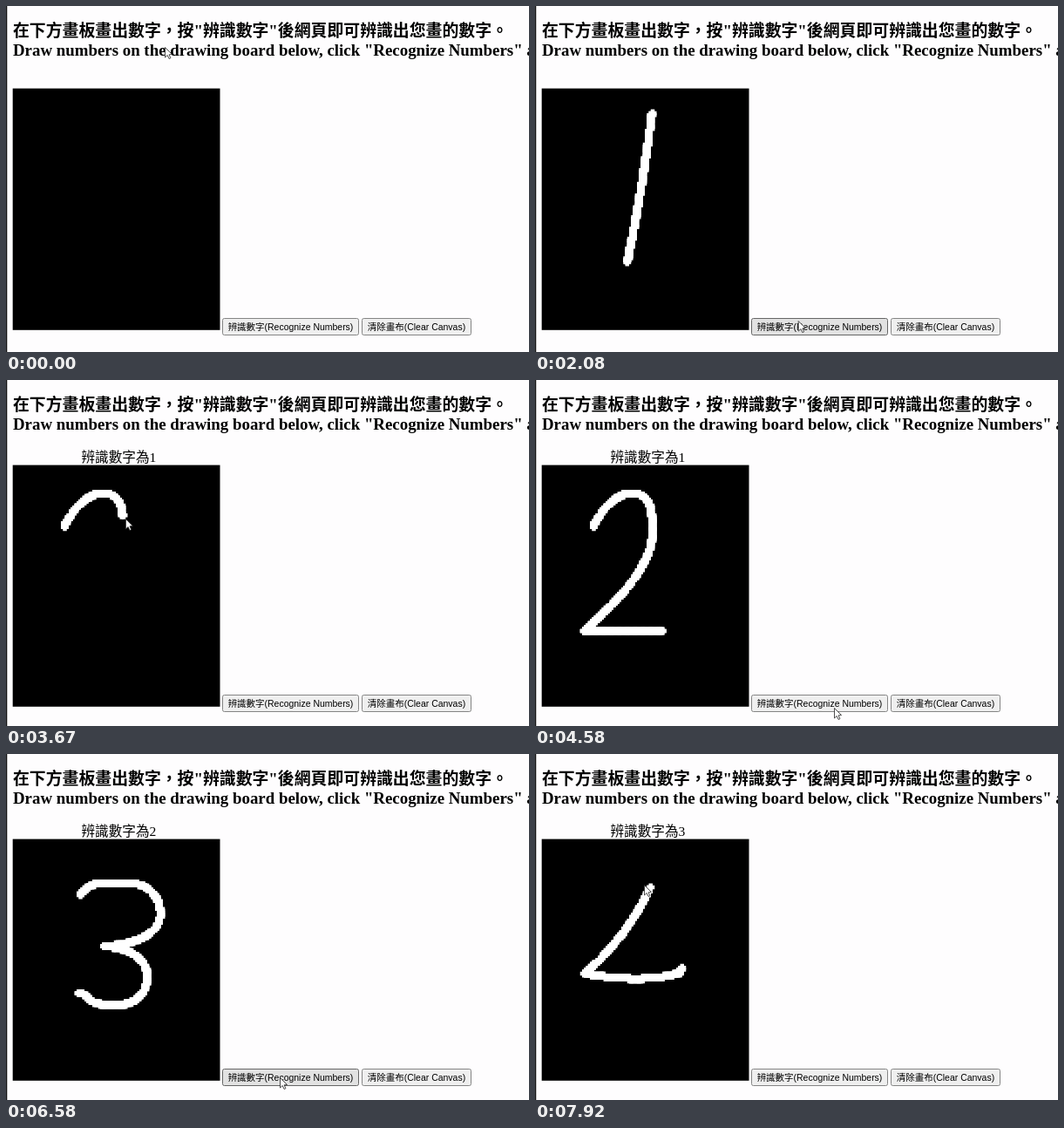
Write an HTML page with a canvas that moves like this. It is 600 px wide and 397 px high and loops after 8 s.

```html
<!DOCTYPE html>
<html lang="zh-TW">
<head>
<meta charset="utf-8">
<title>Digit recognition</title>
<style>
  html, body { margin: 0; width: 100%; height: 100%; overflow: hidden; background: #fefdfe; }
  canvas { display: block; }
</style>
</head>
<body>
<canvas id="stage" width="600" height="397"></canvas>
<script>
const ctx = document.getElementById('stage').getContext('2d');
const LOOP = 8000;
const CELL = 2.25; // size of one drawing-board pixel
const CJK = '"Noto Sans CJK TC", "Noto Sans CJK", sans-serif';
const HEADING = `bold 18.86px "Liberation Serif", ${CJK}`;
const RESULT = `15.6px "Liberation Serif", ${CJK}`;
const BUTTON = `10.47px "Liberation Sans", ${CJK}`;
const CLEAR_BUTTON = [472, 370];

// Drawn between `from` and `to`, recognized at `known`, wiped at `clear`
const digits = [
  { from: 1480, to: 1950, known: 2330, clear: 3000, press: [320, 367],
    path: 'M134 127 Q123 215 106 296' },
  { from: 3480, to: 4150, known: 4800, clear: 5270, press: [343, 376],
    path: 'M67 168 C78 145 95 130 112 130 Q134 131 134 160 V184 Q128 226 56 288 H146' },
  { from: 5500, to: 6260, known: 6800, clear: 7030, press: [314, 371],
    path: `M86 161 Q95 148 112 148 H142 C165 149 177 165 177 184 C177 206 150 218 112 221
           C145 221 162 238 162 255 C162 277 147 288 125 288 Q103 289 94 280 Q89 274 83 275` },
  { from: 7200, to: 7700, known: Infinity, clear: Infinity,
    path: 'M132 154 Q104 212 57 252 Q125 264 166 251 L168 246' },
];

const smooth = k => k * k * (3 - 2 * k);
const progress = (t, from, to) => Math.min(1, Math.max(0, (t - from) / (to - from)));
const offset = ({ x, y }) => [x + 3, y + 3];

// Pointer stops: time and place
const stops = [[0, [182, 47]], [1330, [144, 140]], [2670, [252, 157]]];
for (const digit of digits) {
  const curve = document.createElementNS('http://www.w3.org/2000/svg', 'path');
  curve.setAttribute('d', digit.path);
  const steps = Math.ceil(curve.getTotalLength());
  digit.points = Array.from({ length: steps + 1 }, (_, i) => curve.getPointAtLength(i));

  stops.push([digit.from, offset(digit.points[0])], [digit.to, offset(digit.points[steps])]);
  if (digit.press) {
    stops.push([digit.known - 220, digit.press], [digit.known, digit.press],
               [digit.clear - 50, CLEAR_BUTTON], [digit.clear + 20, CLEAR_BUTTON]);
  }
}
stops.push([7920, [125, 150]], [LOOP + 1, [125, 150]]);
stops.sort((a, b) => a[0] - b[0]);

const penIndex = (digit, t) =>
  Math.floor(progress(t, digit.from, digit.to) * (digit.points.length - 1));

function pointerAt(t) {
  const active = digits.find(d => t >= d.from && t < d.to);
  if (active) return offset(active.points[penIndex(active, t)]);
  const next = stops.findIndex(([time]) => time > t);
  const [t0, [x0, y0]] = stops[next - 1], [t1, [x1, y1]] = stops[next];
  const k = smooth(progress(t, t0, t1));
  return [x0 + (x1 - x0) * k, y0 + (y1 - y0) * k];
}

function write(text, x, y, font, align = 'left') {
  ctx.font = font;
  ctx.textAlign = align;
  ctx.fillStyle = '#000';
  ctx.fillText(text, x, y);
}

function stamp({ x, y }) {
  const cx = Math.round(x / CELL) * CELL, cy = Math.round(y / CELL) * CELL;
  ctx.fillRect(cx - CELL, cy - 2 * CELL, 2 * CELL, 4 * CELL);
  ctx.fillRect(cx - 2 * CELL, cy - CELL, 4 * CELL, 2 * CELL);
}

function drawDigit(digit, t) {
  if (t < digit.from || t >= digit.clear) return;
  ctx.fillStyle = '#fff';
  digit.points.slice(0, penIndex(digit, t) + 1).forEach(stamp);
}

function drawButton(label, x, y, width, [px, py]) {
  const hover = px > x && px < x + width && py > y && py < y + 14;
  ctx.beginPath();
  ctx.roundRect(x + 0.5, y + 0.5, width - 1, 19, 2);
  ctx.fillStyle = hover ? '#e2e2e2' : '#efefef';
  ctx.fill();
  ctx.strokeStyle = hover ? '#666' : '#858585';
  ctx.lineWidth = 1;
  ctx.stroke();
  write(label, x + width / 2, y + 13.7, BUTTON, 'center');
}

const arrow = new Path2D('M0 0 V11.5 L2.7 9 L4.6 13 L6.4 12.2 L4.6 8.3 L8 8 Z');

function drawPointer([x, y]) {
  ctx.save();
  ctx.translate(x + 0.5, y + 0.5);
  ctx.fillStyle = '#fff';
  ctx.fill(arrow);
  ctx.strokeStyle = '#222';
  ctx.lineWidth = 0.8;
  ctx.stroke(arrow);
  ctx.restore();
}

function draw(t) {
  const pointer = pointerAt(t);
  const result = digits.filter(d => t >= d.known).length;
  const shift = result ? 0 : -3; // the result line pushes the board down

  ctx.fillStyle = '#fefdfe';
  ctx.fillRect(0, 0, 600, 397);
  ctx.fillStyle = '#111';
  ctx.fillRect(0, 0, 1.3, 397);

  write('在下方畫板畫出數字，按"辨識數字"後網頁即可辨識出您畫的數字。', 8, 34.5, HEADING);
  write('Draw numbers on the drawing board below, click "Recognize Numbers" and', 8, 56.5, HEADING);
  if (result) write('辨識數字為' + result, 86.5, 93.5, RESULT);

  ctx.save();
  ctx.translate(0, shift);
  ctx.fillStyle = '#000';
  ctx.fillRect(7.7, 97.6, 237.8, 277.2);
  digits.forEach(digit => drawDigit(digit, t));
  ctx.restore();

  drawButton('辨識數字(Recognize Numbers)', 248, 361 + shift, 157, pointer);
  drawButton('清除畫布(Clear Canvas)', 408, 361 + shift, 126, pointer);
  drawPointer(pointer);
}

function frame() {
  draw(performance.now() % LOOP);
  requestAnimationFrame(frame);
}
frame();
</script>
</body>
</html>
```
